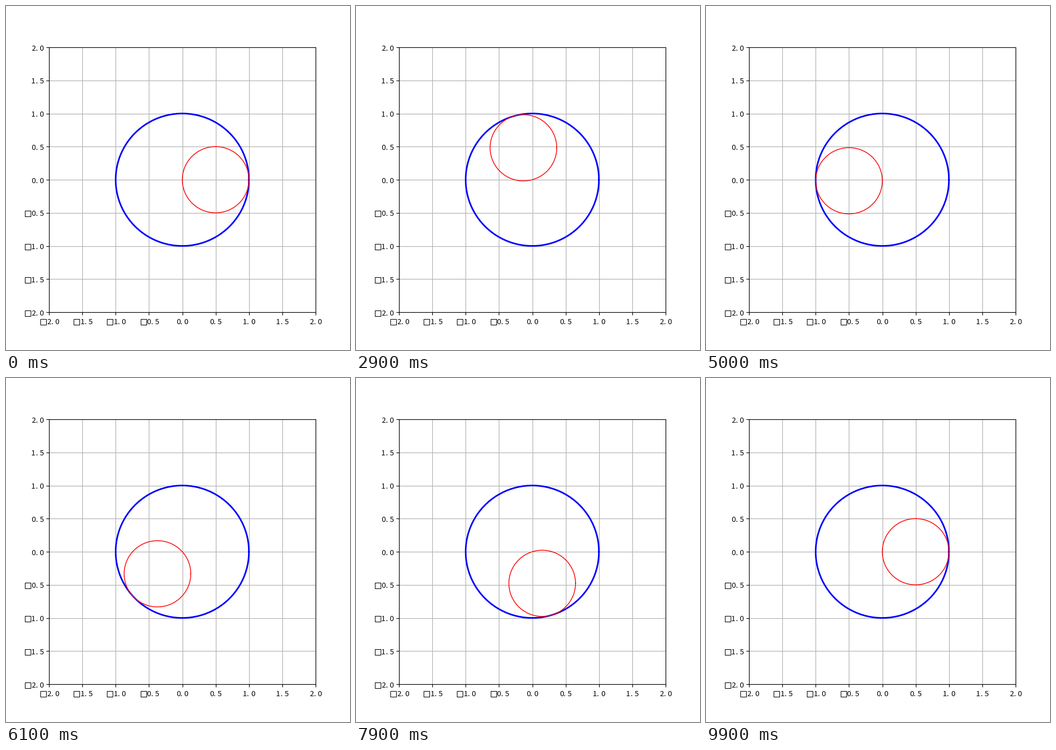
A matplotlib script for the animation above (10000 ms loop, 600x600 px).

```python
import numpy as np
import matplotlib.pyplot as plt
from matplotlib.animation import FuncAnimation
from matplotlib.patches import Rectangle
from matplotlib.transforms import IdentityTransform

FRAMES = 100
EM = 10 * 100 / 72      # label em in pixels
CELL = EM / 2           # half-width character cell
PIXELS = IdentityTransform()

fig, ax = plt.subplots(figsize=(6, 6), dpi=100)
ax.set_xlim(-2, 2)
ax.set_ylim(-2, 2)
ticks = np.arange(-2, 2.1, 0.5)
ax.set_xticks(ticks, labels=[])
ax.set_yticks(ticks, labels=[])
ax.grid(True)


def label_width(value):
    return 3 * CELL + (EM if value < 0 else 0)


def draw_label(value, x, y):
    """Half-width digits from pixel x on baseline y; the minus sign is an empty box."""
    if value < 0:
        fig.add_artist(Rectangle((int(x + 2) + 0.5, y - 0.5), 10, 10, fill=False,
                                 ec="black", lw=0.72, transform=PIXELS))
        x += EM
    for i, char in enumerate(f"{abs(value):.1f}"):
        offset = 2 if char == "." else CELL / 2
        fig.text(x + i * CELL + offset, y, char, ha="center", va="baseline",
                 family="Noto Sans CJK JP", size=9.4, transform=PIXELS)


for v in ticks:
    px, py = ax.transData.transform((v, v))
    draw_label(v, px - label_width(v) / 2, 45)
    draw_label(v, 65.3 - label_width(v), round(py - 5.6))

theta = np.linspace(0, 2 * np.pi, 100)
cos, sin = np.cos(theta), np.sin(theta)
ax.plot(cos, sin, color="blue", lw=2)
inner, = ax.plot([], [], color="red", lw=1)


def update(frame):
    angle = 2 * np.pi * frame / (FRAMES - 1)
    inner.set_data(0.5 * (cos + np.cos(angle)), 0.5 * (sin + np.sin(angle)))
    return inner,


anim = FuncAnimation(fig, update, frames=FRAMES, interval=100,
                     repeat=True, repeat_delay=0)
plt.show()
```
